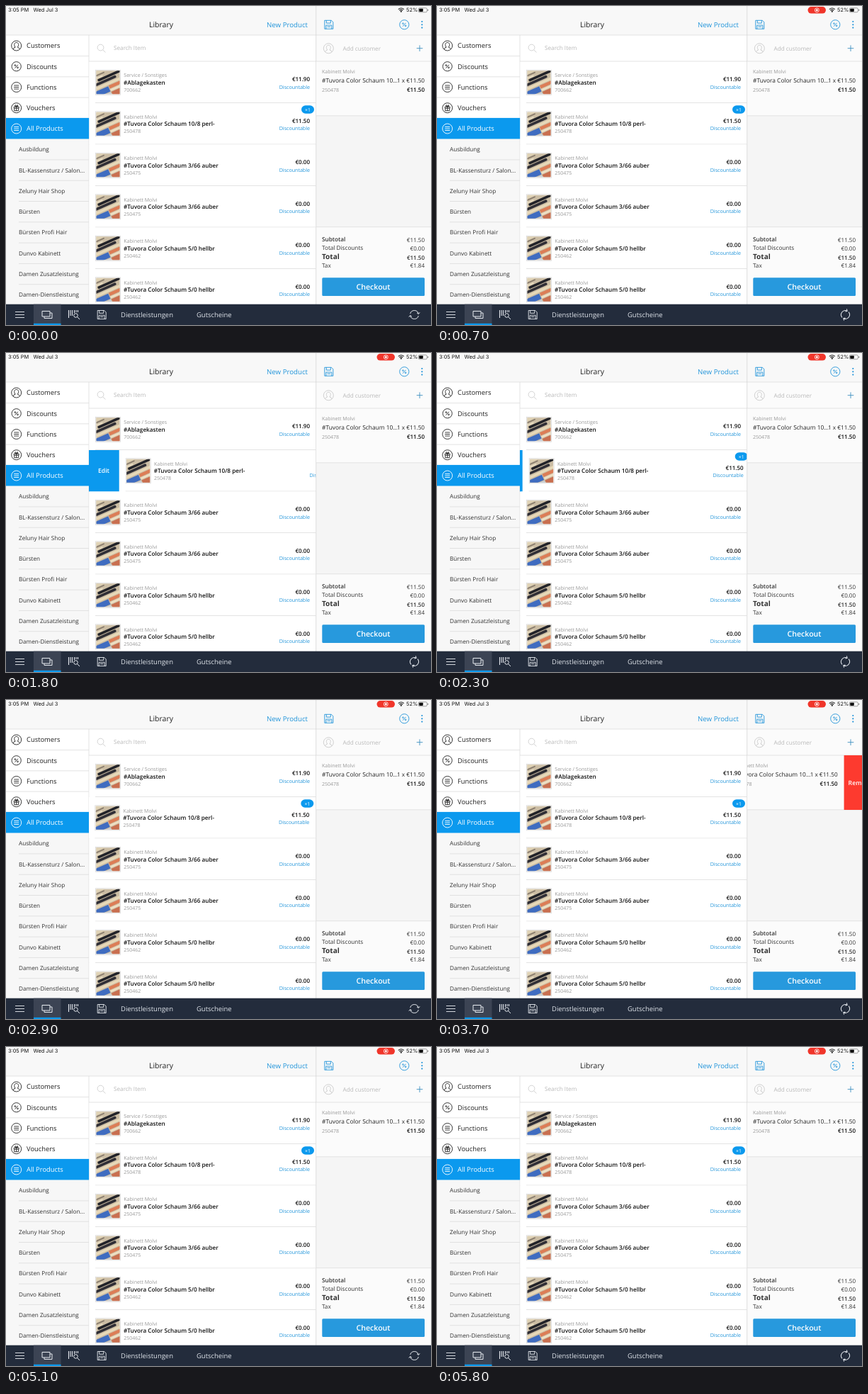
An HTML page that plays this animation: 600 by 450 pixels, repeating every 5900 ms.

```html
<!DOCTYPE html>
<html lang="en">
<head>
<meta charset="utf-8">
<title>Library</title>
<style>
  html, body { margin: 0; width: 100%; height: 100%; overflow: hidden; background: #fff; }
  svg { display: block; width: 100vw; height: 100vh; font-family: "Open Sans", "Noto Sans", sans-serif; text-rendering: geometricPrecision; }
  .status { font-family: Inter, "Liberation Sans", sans-serif; }
</style>
</head>
<body>
<svg id="stage" viewBox="0 0 600 450">
  <defs>
    <clipPath id="listClip"><rect x="117" y="41" width="320.5" height="380"/></clipPath>
    <clipPath id="cartClip"><rect x="438" y="78" width="162" height="77"/></clipPath>
    <clipPath id="photoClip"><rect x="1.5" y="1.5" width="33" height="33"/></clipPath>
    <g id="photo">
      <rect x=".5" y=".5" width="35" height="35" fill="#fff" stroke="#d9d9d9" stroke-width=".8"/>
      <g clip-path="url(#photoClip)">
        <rect width="36" height="36" fill="#cbbda4"/>
        <g transform="rotate(-24 18 18)">
          <rect x="-5" y="-4" width="48" height="5" fill="#e0d3b6"/>
          <rect x="-5" y="2" width="24" height="1.6" fill="#85796a"/>
          <rect x="-5" y="5" width="20" height="2.2" fill="#e6dabf"/>
          <rect x="6" y="8" width="36" height="3.6" rx="1.5" fill="#222329"/>
          <rect x="-4" y="12.7" width="36" height="3.6" rx="1.5" fill="#302f36"/>
          <rect x="-4" y="18" width="46" height="3.4" fill="#e8d9b8"/>
          <rect x="-4" y="23" width="20" height="8" fill="#3f6cc0"/>
          <rect x="17" y="22.5" width="24" height="4.5" fill="#dc7d56"/>
          <rect x="17" y="28" width="24" height="3" fill="#efdfc2"/>
          <rect x="-4" y="32" width="20" height="5" fill="#c9d0da"/>
          <rect x="17" y="32" width="24" height="8" fill="#c96f50"/>
        </g>
      </g>
    </g>
    <g id="person" fill="none">
      <circle r="7"/>
      <path d="M-4.8 5Q-4.3 3-1.6 2.2C-4-1-3-4.5 0-4.5S4-1 1.6 2.2Q4.3 3 4.8 5"/>
    </g>
    <g id="percent" fill="none">
      <circle r="6.6"/><path d="M-2.2 2.4 2.2-2.4"/><circle cx="-1.8" cy="-1.6" r=".9"/><circle cx="1.8" cy="1.6" r=".9"/>
    </g>
    <g id="lines" fill="none"><circle r="7"/><path d="M-3.5-2.5h7M-3.5 0h7M-3.5 2.5h7"/></g>
    <g id="gift" fill="none">
      <circle r="7"/><path d="M-3.5-1.5h7v2h-7zM-3 .5v3.5h6V.5M0-1.5V4M0-1.5Q-3-2-2-3.7T0-1.5Q3-2 2-3.7T0-1.5"/>
    </g>
    <g id="save" fill="none">
      <path d="M-6-6H3.5L6-3.5V6H-6zM-3.5-6v3.8h6V-6M-4 6V.8h8V6M-2.3 3h4.6"/>
    </g>
  </defs>
  <g id="base"></g>
  <g id="list" clip-path="url(#listClip)"></g>
  <g id="chrome"></g>
  <g id="cart" clip-path="url(#cartClip)"></g>
</svg>
<script>
const $ = id => document.getElementById(id);
const rect = (x, y, w, h, fill, rx = 0) =>
  `<rect x="${x}" y="${y}" width="${w}" height="${h}" fill="${fill}" rx="${rx}"/>`;
const line = (x1, y1, x2, y2, color = "#dcdcdc", width = .8) =>
  `<path d="M${x1} ${y1}L${x2} ${y2}" stroke="${color}" stroke-width="${width}"/>`;
const text = (x, y, str, size, fill = "#222", anchor = "start", weight = 400) =>
  `<text x="${x}" y="${y}" font-size="${size}" fill="${fill}" text-anchor="${anchor}" font-weight="${weight}">${str}</text>`;
const icon = (id, x, y, color, width = .9) =>
  `<use href="#${id}" transform="translate(${x} ${y})" stroke="${color}" stroke-width="${width}"/>`;
const path = (d, color, width = 1) =>
  `<path d="${d}" fill="none" stroke="${color}" stroke-width="${width}"/>`;

const BLUE = "#0b99ee", LINK = "#2295da", GREY = "#999", ACTION = 43.4;
const BRAND = "Kabinett Molvi", FOAM = "#Tuvora Color Schaum";

function drawBase() {
  let out = rect(0, 0, 600, 450, "#fff") + rect(0, 0, 600, 41, "#f8f8f8");
  out += rect(0, 187.5, 117, 233.5, "#f7f7f7") + rect(438, 41, 162, 380, "#fbfbfb");
  out += rect(438, 155, 162, 156.5, "#f5f5f5") + line(117, 41, 117, 421);

  const menu = [["person", "Customers"], ["percent", "Discounts"], ["lines", "Functions"],
    ["gift", "Vouchers"], ["lines", "All Products"]];
  menu.forEach(([id, label], i) => {
    const y = 56 + 29.25 * i, active = i === 4;
    if (active) out += rect(0, 157.9, 117.3, 29.6, BLUE);
    out += icon(id, 14.7, y, active ? "#fff" : "#222");
    out += text(29, y + 3.3, label, 9.4, active ? "#fff" : "#222");
    if (i < 3) out += line(0, y + 14.6, 117, y + 14.6);
  });
  const groups = ["Ausbildung", "BL-Kassensturz / Salon...", "Zeluny Hair Shop", "Bürsten",
    "Bürsten Profi Hair", "Dunvo Kabinett", "Damen Zusatzleistung", "Damen-Dienstleistung"];
  groups.forEach((label, i) => {
    const y = 202.2 + 29.3 * i;
    out += text(18, y + 3, label, 8.2, "#333") + line(18, y + 14.7, 117, y + 14.7);
  });
  $("base").innerHTML = out;
}

function productRow([category, name, code, price], i) {
  const y = 78 + 58.5 * i;
  let out = rect(117.5, y + .5, 320, 58, "#fff");
  out += `<use href="#photo" x="126" y="${y + 11.8}"/>`;
  out += text(166.3, y + 22, category, 7.05, GREY) + text(166, y + 32.7, name, 8.2, "#111", "start", 600);
  out += text(166.3, y + 42.6, code, 7, GREY);
  out += text(429, y + 28.4, price, 8, "#111", "end", 600) + text(429, y + 38.5, "Discountable", 7.1, LINK, "end");
  out += line(126, y + 58.5, 437.5, y + 58.5);
  if (i === 1) {
    out += rect(417, y + 3.7, 18, 11.6, BLUE, 5.8) + text(426, y + 12, "×1", 6.8, "#fff", "middle");
    out += `</g><g id="edit">` + rect(17, y + .5, 100, 58.5, BLUE);
    out += text(117 - ACTION / 2, y + 32, "Edit", 8.6, "#fff", "middle", 600);
  }
  return `<g${i === 1 ? ' id="swiped"' : ""}>${out}</g>`;
}

function drawList() {
  const products = [
    ["Service / Sonstiges", "#Ablagekasten", "700662", "€11.90"],
    [BRAND, FOAM + " 10/8 perl-", "250478", "€11.50"],
    ...["3/66 auber", "3/66 auber", "5/0 hellbr", "5/0 hellbr"].map((shade, i) =>
      [BRAND, `${FOAM} ${shade}`, i < 2 ? "250475" : "250462", "€0.00"])
  ];
  $("list").innerHTML = products.map(productRow).join("");
}

function drawCart() {
  $("cart").innerHTML = `<g id="item">` + rect(438, 78, 162, 77, "#fbfbfb") +
    line(438, 78, 600, 78) + line(438, 154.8, 600, 154.8) +
    text(446, 95, BRAND, 7, GREY) + text(446, 107.6, FOAM + " 10...", 8.4) +
    text(591, 107.6, "1 x €11.50", 8.2, "#222", "end") + text(446, 120.5, "250478", 7, GREY) +
    text(591, 120.8, "€11.50", 8, "#111", "end", 600) +
    rect(600, 78, 100, 77, "#fd3a2f") + text(606, 119.7, "Remove", 8.7, "#fff", "start", 600) + `</g>`;
}

function drawStatus() {
  let out = text(3, 8.4, "3:05 PM", 7.4, "#111") + text(38.5, 8.4, "Wed Jul 3", 7.4, "#111");
  out += `<g id="recording">` + rect(523.5, 1, 25.5, 9.6, "#f0352a", 4.8) +
    `<circle cx="536.3" cy="5.8" r="3" fill="none" stroke="#fff" stroke-width=".8"/><circle cx="536.3" cy="5.8" r="1.5" fill="#fff"/></g>`;
  out += path("M553.8 4.6Q557.8 1.4 561.8 4.6M555.3 6.3Q557.8 4.3 560.3 6.3", "#111", 1.1) +
    `<circle cx="557.8" cy="7.7" r="1.1" fill="#111"/>`;
  out += text(565, 8.4, "52%", 7.4, "#111");
  out += `<rect x="582.3" y="2.8" width="12" height="6" rx="1.6" fill="none" stroke="#777" stroke-width=".7"/>` +
    rect(583.2, 3.7, 5.6, 4.2, "#111", .8) + rect(595.2, 4.8, 1, 2, "#777", .5);
  return `<g class="status">${out}</g>`;
}

function drawToolbar() {
  const light = "#e8ecf1";
  let out = rect(0, 420.7, 600, 29.3, "#232c3c") + rect(39, 420.7, 38.5, 29.3, "#3c4454") + rect(39, 447.8, 38.5, 2.2, BLUE);
  out += path("M13 431.5h13M13 435.5h13M13 439.5h13", light, .9);
  out += path("M51 430.5h11v7.5h-11zM54 438v2.5h11v-7.5h-3", light);
  out += path("M88.5 429v11M91 429v8M93.5 429v8M96.5 429v4M99 429v3M101.5 429v3", light, 1.1);
  out += `<circle cx="98.5" cy="436.5" r="2.8" fill="none" stroke="${light}"/>` + path("M100.5 438.5 104 442", light);
  out += icon("save", 135.2, 435.5, light);
  out += text(162, 438.9, "Dienstleistungen", 9.45, "#dfe4ea") + text(269, 438.9, "Gutscheine", 9.45, "#dfe4ea");
  out += `<g id="sync">` + path("M-5.8-1.5A6 6 0 0 1 5.8-1.5M5.8 1.5A6 6 0 0 1-5.8 1.5", light) +
    path("M3.6-2.7 5.8-.9 7.6-3.2M-3.6 2.7-5.8 .9-7.6 3.2", light) + `</g>`;
  return out;
}

function drawChrome() {
  let out = drawStatus() + text(219, 30, "Library", 10.5, "#222", "middle", 500) +
    text(426, 29.7, "New Product", 9.7, LINK, "end");
  out += icon("save", 455.8, 26.3, LINK) + icon("percent", 562.3, 26.3, LINK);
  out += [22, 26.3, 30.6].map(y => `<circle cx="587.3" cy="${y}" r="1.1" fill="${LINK}"/>`).join("");
  out += line(0, 41, 600, 41) + line(117, 78, 438, 78) + line(437.7, 0, 437.7, 421, "#d5d5d5");
  out += `<circle cx="133.5" cy="58.6" r="4.4" fill="none" stroke="#c8c8c8" stroke-width=".8"/>` + line(136.7, 61.8, 140.5, 65.6, "#c8c8c8");
  out += text(152, 62.4, "Search Item", 8.2, "#b9b9b9");
  out += icon("person", 455.3, 59.8, "#c4c4c4", .8) + text(475.5, 62.7, "Add customer", 8.2, "#b9b9b9");
  out += path("M579.7 59.7h8.6M584 55.4v8.6", "#3d8fc0", .9);
  out += line(438, 78, 600, 78) + line(438, 154.8, 600, 154.8) + line(438, 311.7, 600, 311.7);
  const totals = [["Subtotal", "€11.50", 332, 8.2, 600, 400], ["Total Discounts", "€0.00", 344.2, 8.2, 400, 400],
    ["Total", "€11.50", 357, 10, 700, 600], ["Tax", "€1.84", 368.8, 8.2, 400, 400]];
  for (const [label, value, y, size, weight, valueWeight] of totals)
    out += text(446, y, label, size, "#333", "start", weight) + text(591, y + .6, value, 8, "#333", "end", valueWeight);
  out += rect(446.3, 383.3, 144.7, 25.7, "#2799dd", 1.5) + text(518.5, 400, "Checkout", 10.6, "#fff", "middle", 600);
  $("chrome").innerHTML = out + drawToolbar();
}

const LOOP = 5900, STEP = 100;
const editKeys = [[900, 0], [1700, ACTION], [1750, ACTION], [2420, 0], [2900, -.7], [3000, 0]];
const removeKeys = [[3310, 0], [4010, -ACTION], [4310, -ACTION], [5000, 0]];

function ease(keys, t) {
  const next = keys.findIndex(([time]) => t < time);
  if (next === 0) return keys[0][1];
  if (next < 0) return keys[keys.length - 1][1];
  const [t0, v0] = keys[next - 1], [t1, v1] = keys[next];
  const p = (t - t0) / (t1 - t0);
  return v0 + (v1 - v0) * p * p * (3 - 2 * p);
}

function render(now) {
  const t = Math.floor((now % LOOP) / STEP) * STEP;
  const shift = `translate(${ease(editKeys, t)} 0)`;
  $("swiped").setAttribute("transform", shift);
  $("edit").setAttribute("transform", shift);
  $("item").setAttribute("transform", `translate(${ease(removeKeys, t)} 0)`);
  // The sync arrows flip level for a moment once a second.
  const angle = (t + 100) % 1000 < 300 ? 0 : 126;
  $("sync").setAttribute("transform", `translate(576.5 435.5) rotate(${angle})`);
  $("recording").setAttribute("visibility", t < 500 ? "hidden" : "visible");
}

drawBase();
drawList();
drawCart();
drawChrome();
const start = performance.now();
function tick() {
  render(performance.now() - start);
  requestAnimationFrame(tick);
}
tick();
</script>
</body>
</html>
```
